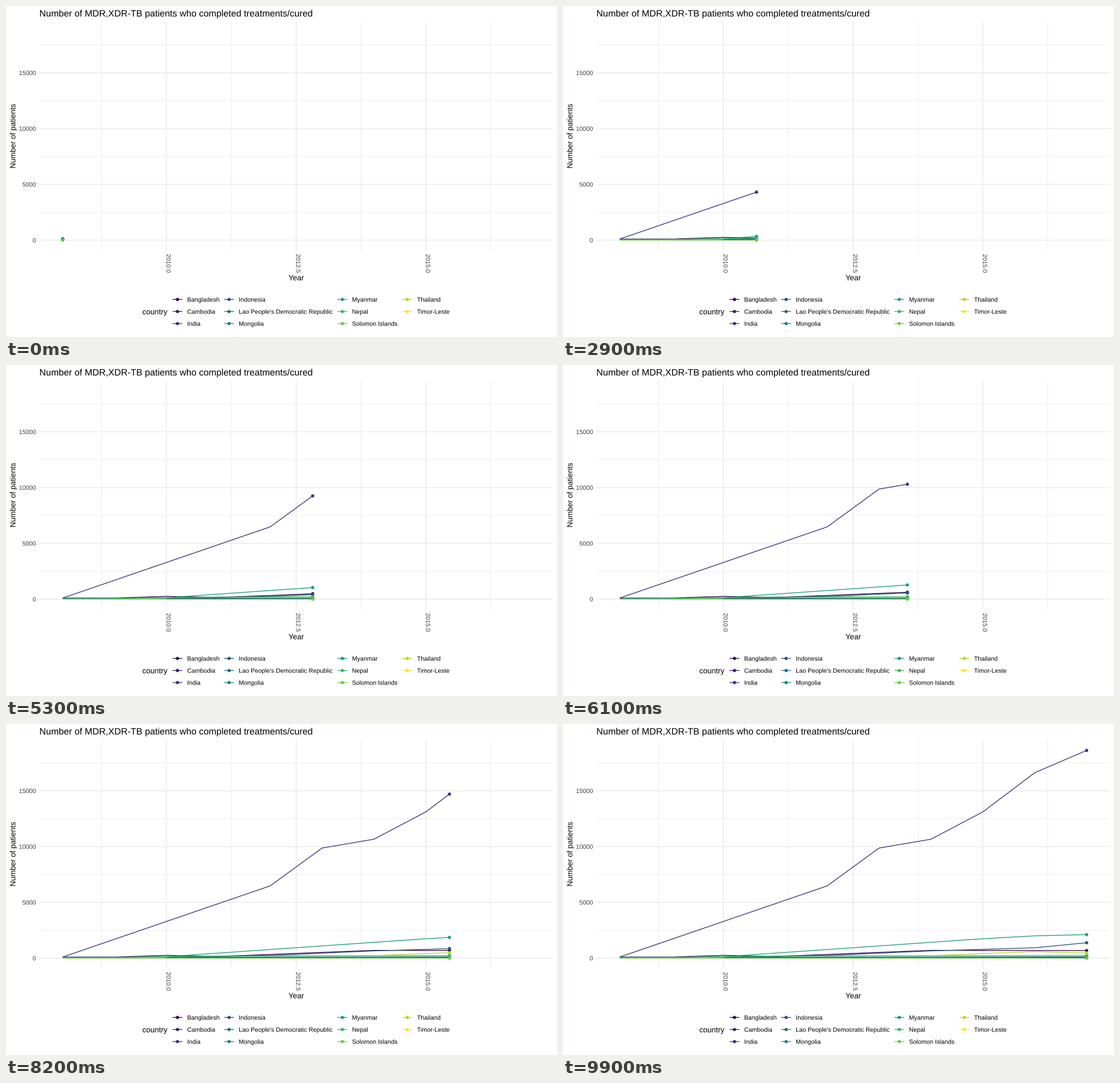
Write a matplotlib script that moves like this. It is 966 by 580 pixels and loops after 10000 ms.

```python
import matplotlib.pyplot as plt
import numpy as np
from matplotlib.animation import FuncAnimation
from matplotlib.patches import Circle, PathPatch
from matplotlib.textpath import TextPath
from matplotlib.transforms import Affine2D

W, H, DPI = 966, 580, 100
FRAMES = 100
START, END = 2008, 2017
SMALL, MEDIUM, LARGE = 10.78, 13.4, 16.09  # text sizes in pixels
STROKE, RADIUS = 1.35, 2.85
GRID, TICK = "#e8e8e8", "#404040"
LEFT, RIGHT, TOP, BOTTOM = 58.5, 958.9, 28.1, 428.5

# Turning points per country: year, patients
TURNS = {
    "Bangladesh": [(2008, 100), (2009, 100), (2010, 250), (2011, 150),
                   (2014, 700), (2017, 680)],
    "Cambodia": [(2010, 40), (2017, 90)],
    "India": [(2008, 100), (2012, 6480), (2013, 9870), (2014, 10660),
              (2015, 13110), (2016, 16620), (2017, 18620)],
    "Indonesia": [(2010, 130), (2012, 240), (2014, 650), (2016, 930),
                  (2017, 1380)],
    "Lao People's Democratic Republic": [(2011, 5), (2017, 30)],
    "Mongolia": [(2008, 70), (2017, 130)],
    "Myanmar": [(2009, 60), (2010, 130), (2015, 1740), (2016, 2000),
                (2017, 2110)],
    "Nepal": [(2009, 80), (2012, 200), (2017, 250)],
    "Solomon Islands": [(2008, 0), (2017, 0)],
    "Thailand": [(2014, 230), (2016, 590), (2017, 460)],
    "Timor-Leste": [],
}
COLORS = plt.get_cmap("viridis")(np.linspace(0, 1, len(TURNS)))[:, :3] ** 1.15

plt.rcParams["font.family"] = "Liberation Sans"
fig = plt.figure(figsize=(W / 100, H / 100), dpi=DPI, facecolor="white")
ax = fig.add_axes([0, 0, 1, 1])
ax.set_xlim(0, W)
ax.set_ylim(H, 0)
ax.axis("off")


def px(year):
    """Pixel column of a year; the range has 5% padding on both sides."""
    pad = 0.05 * (END - START)
    return np.interp(year, [START - pad, END + pad], [LEFT, RIGHT])


def py(value):
    return np.interp(value, [-931, 19551], [BOTTOM, TOP])


def label(x, y, text, size, align=0, turn=0, color="black"):
    """Draw text from its baseline; align 0, 0.5, 1 is left, centre, right."""
    path = TextPath((0, 0), text, size=size)
    box = path.get_extents()
    place = (Affine2D().translate(-align * box.x1, 0).scale(1, -1)
             .rotate_deg(turn).translate(x, y))
    ax.add_patch(PathPatch(place.transform_path(path), fc=color, lw=0))
    return box.width


def stroke(xs, ys, color, width=STROKE, z=1.0):
    line, = ax.plot(xs, ys, color=color, lw=width * 72 / DPI, zorder=z,
                    solid_capstyle="butt", snap=False)
    return line


def dot(x, y, color, z=3.0):
    return ax.add_patch(Circle((x, y), RADIUS, fc=color, lw=0, zorder=z))


# Grid and axes
for width, years, values in [
        (0.8, np.arange(2008.75, END, 2.5), range(2500, 18000, 5000)),
        (STROKE, [2010, 2012.5, 2015], range(0, 15001, 5000))]:
    for year in years:
        stroke([px(year)] * 2, [TOP, BOTTOM], GRID, width)
    for value in values:
        stroke([LEFT, RIGHT], [py(value)] * 2, GRID, width)
for year in years:
    label(px(year), 434.6, f"{year:.1f}", SMALL, turn=90, color=TICK)
for value in values:
    label(52.2, py(value) + 3.9, str(value), SMALL, align=1, color=TICK)

label(LEFT, 18.4, "Number of MDR,XDR-TB patients who completed treatments/cured",
      LARGE)
label((LEFT + RIGHT) / 2, 480.6, "Year", MEDIUM, align=0.5)
label(16.5, (TOP + BOTTOM) / 2, "Number of patients", MEDIUM, align=0.5,
      turn=-90)

# Legend, three rows, each column as wide as its longest name
label(239, 540.3, "country", MEDIUM)
names, x = list(TURNS), 300.6
for first in range(0, len(names), 3):
    widths = []
    for i, name in enumerate(names[first:first + 3]):
        y, color = 514.2 + 21.15 * i, COLORS[first + i]
        stroke([x - 8.45, x + 8.45], [y, y], color)
        dot(x, y, color)
        widths.append(label(x + 17, y + 3.9, name, SMALL))
    x += max(widths) + 35.2

# Series
series = []
for i, (turns, color) in enumerate(zip(TURNS.values(), COLORS)):
    if turns:
        years, values = np.array(turns, float).T
        series.append((years, values, stroke([], [], color, z=2 + i / 100),
                       dot(0, 0, color, z=3 + i / 100)))


def update(frame):
    now = START + (END - START) * frame / (FRAMES - 1)
    for years, values, line, head in series:
        shown = now >= years[0] - 1e-6
        line.set_visible(shown)
        head.set_visible(shown)
        past = years < now
        value = np.interp(now, years, values)
        line.set_data(px(np.append(years[past], now)),
                      py(np.append(values[past], value)))
        head.center = px(now), py(value)
    return [artist for s in series for artist in s[2:]]


anim = FuncAnimation(fig, update, frames=FRAMES, interval=100, repeat=True,
                     repeat_delay=0, blit=False)
plt.show()
```
